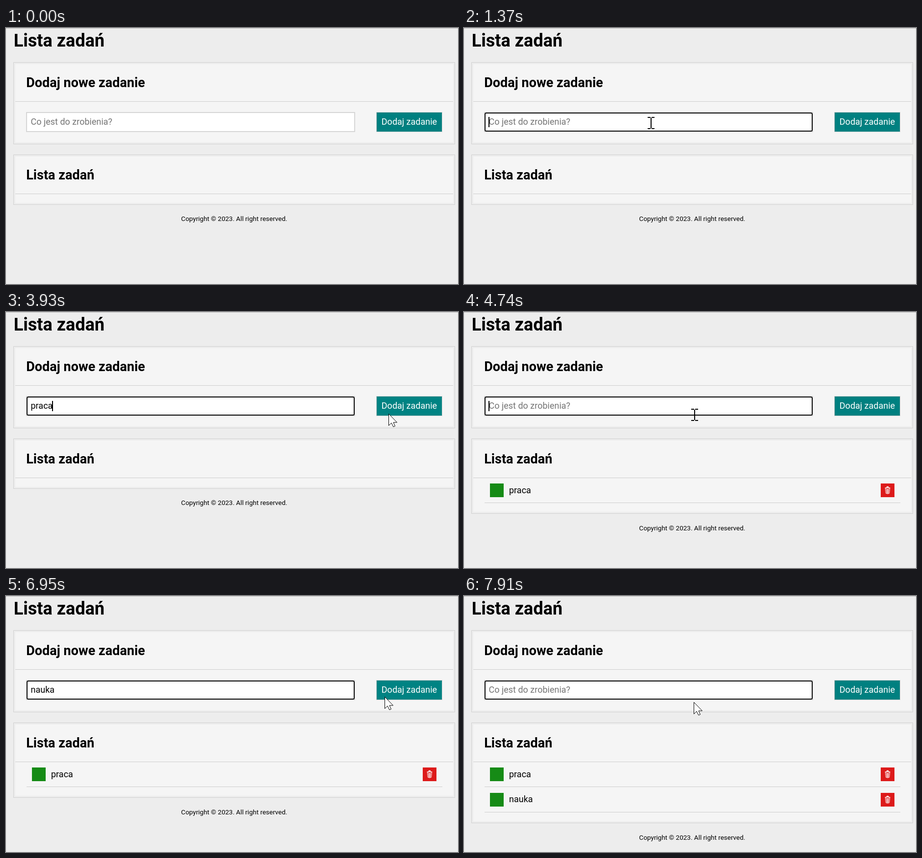
An HTML page that plays this animation: 923x524 px, repeating every 8000 ms.

```html
<!DOCTYPE html>
<html lang="pl">
<head>
<meta charset="utf-8">
<title>Lista zadań</title>
<style>
  html, body { margin: 0; width: 100%; height: 100%; overflow: hidden; background: #ededed; }
  svg { display: block; width: 100%; height: 100%; font: 18px Roboto, sans-serif; }
  .h1 { font-size: 36px; font-weight: 700; }
  .h2 { font-size: 27px; font-weight: 700; }
  .frame { fill: #ededed; stroke: #d1d1d1; }
  .inside { fill: #f5f5f5; }
  .rule { stroke: #cecece; }
  #footer { font-size: 13.5px; }
</style>
</head>
<body>
<svg viewBox="0 0 923 524">
  <defs>
    <g id="trash" fill="none" stroke="#fff">
      <path d="M-5.5-4.5Q0-7 5.5-4.5M-2-6.5Q0-8.5 2-6.5" stroke-width="1.3"/>
      <path d="M-4.5-3.5-3.5 6.2Q0 8 3.5 6.2L4.5-3.5Q0-1.8-4.5-3.5M-1.8-2.5-1.4 6.8M1.8-2.5 1.4 6.8M0-2V7" stroke-width=".9"/>
      <path d="M-4 0Q0 1.6 4 0M-3.8 3Q0 4.6 3.8 3" stroke-width=".6"/>
    </g>
  </defs>

  <rect width="923" height="1" fill="#bababa"/>
  <text class="h1" x="15.75" y="38">Lista zadań</text>

  <rect class="frame" x="15.5" y="70.5" width="901" height="167"/>
  <rect class="inside" x="19" y="74" width="894" height="160"/>
  <text class="h2" x="41.25" y="121">Dodaj nowe zadanie</text>
  <path class="rule" d="M19 150.5H913"/>

  <rect x="42" y="173" width="670" height="39" fill="#fff" stroke="#d6d6d6" stroke-width="2"/>
  <rect id="focusRing" x="43" y="174" width="668" height="37" rx="2.5" fill="#fff" stroke="#101010" stroke-width="2"/>
  <text id="value" x="50.5" y="198"></text>
  <rect id="caret" y="182" width="2" height="21"/>

  <rect id="button" x="756.5" y="172.5" width="134" height="40" stroke="#ccc"/>
  <text x="766.8" y="198" fill="#fff">Dodaj zadanie</text>

  <rect id="listFrame" class="frame" x="15.5" y="259.5" width="901"/>
  <rect id="listInside" class="inside" x="19" y="263" width="894"/>
  <text class="h2" x="41.25" y="310">Lista zadań</text>
  <path class="rule" d="M19 339.5H913"/>
  <g id="rows"></g>
  <text id="footer" x="466" text-anchor="middle">Copyright © 2023. All right reserved.</text>

  <path id="arrow" d="M.5.5V24.5L6 19 10 27 13.5 25.5 10 18H17.5Z" fill="#fff" stroke="#000"/>
  <path id="beam" d="M-7-11H-1M1-11H7M0-10V11M-7 12H-1M1 12H7" fill="none" stroke="#000" stroke-width="2"/>
</svg>
<script>
const LOOP = 8000, FOCUS = 970, BLINK = 530;
const $ = id => document.getElementById(id);
const clamp = v => Math.max(0, Math.min(1, v));
const show = (node, visible) => node.setAttribute('visibility', visible ? 'visible' : 'hidden');
const smooth = p => p * p * (3 - 2 * p);
const easeOut = p => 1 - (1 - p) ** 3;

// Each task is typed at an even pace, then submitted.
const tasks = [
  { name: 'praca', start: 1900, pace: 147, submit: 4270 },
  { name: 'nauka', start: 5530, pace: 122, submit: 7300 }
];

// Pointer moves; sag bends the way downwards.
const entry = { x: 739, y: 467 };
const moves = [
  { start: 200, end: 970, x: 382, y: 194, sag: 80, ease: easeOut },
  { start: 3240, end: 4000, x: 791, y: 203, sag: 60, ease: smooth },
  { start: 4280, end: 4740, x: 471, y: 210, sag: 14, ease: smooth },
  { start: 4740, end: 4810, x: 471, y: 203, sag: 0, ease: smooth },
  { start: 6570, end: 6990, x: 780, y: 205, sag: 15, ease: smooth },
  { start: 7430, end: 7910, x: 469, y: 217, sag: 5, ease: smooth }
];

function pointerAt(t) {
  let { x, y } = entry;
  for (const move of moves) {
    if (t < move.start) break;
    const k = move.ease(clamp((t - move.start) / (move.end - move.start)));
    x += (move.x - x) * k;
    y += (move.y - y) * k + move.sag * 4 * k * (1 - k);
  }
  return { x, y };
}

function fieldAt(t) {
  let text = '', changed = FOCUS;
  for (const { name, start, pace, submit } of tasks) {
    if (t < start) break;
    const typed = Math.min(name.length, Math.floor((t - start) / pace) + 1);
    const done = t >= submit;
    text = done ? '' : name.slice(0, typed);
    changed = done ? submit : start + (typed - 1) * pace;
  }
  return { text, changed };
}

$('rows').innerHTML = tasks.map(({ name }, i) => {
  const y = 351 + 52 * i;
  return `<g><rect x="53" y="${y}" width="28" height="28" fill="#168b16"/>
    <text x="92" y="${371 + 51 * i}">${name}</text>
    <rect x="851" y="${y}" width="28" height="28" fill="#dd1a1a"/>
    <use href="#trash" x="865" y="${y + 14}"/>
    <path class="rule" d="M42 ${y + 39.5}H891"/></g>`;
}).join('');

function drawField(t) {
  const { text, changed } = fieldAt(t);
  const focused = t >= FOCUS;
  $('value').textContent = text || 'Co jest do zrobienia?';
  $('value').setAttribute('fill', text ? '#000' : '#757575');
  show($('focusRing'), focused);
  show($('caret'), focused && Math.floor((t - changed) / BLINK) % 2 === 0);
  const width = text ? $('value').getComputedTextLength() : 0;
  $('caret').setAttribute('x', Math.floor(50 + width));
}

function drawList(t) {
  const count = tasks.filter(task => task.submit <= t).length;
  const height = Math.floor(102 + 51.5 * count);
  $('listFrame').setAttribute('height', height);
  $('listInside').setAttribute('height', height - 7);
  $('footer').setAttribute('y', 395 + 52 * count);
  [...$('rows').children].forEach((row, i) => show(row, i < count));
}

function drawPointer(t) {
  const visible = t >= moves[0].start;
  const { x, y } = pointerAt(t);
  const within = (left, right) => x > left && x < right && y > 172 && y < 213;
  const overField = within(41, 713);
  show($('beam'), visible && overField);
  show($('arrow'), visible && !overField);
  for (const id of ['beam', 'arrow'])
    $(id).setAttribute('transform', `translate(${Math.round(x)} ${Math.round(y)})`);
  $('button').setAttribute('fill', within(757, 890) ? '#008383' : '#008080');
}

function draw(now) {
  const t = now % LOOP;
  drawField(t);
  drawList(t);
  drawPointer(t);
  requestAnimationFrame(draw);
}
draw(0);
</script>
</body>
</html>
```
